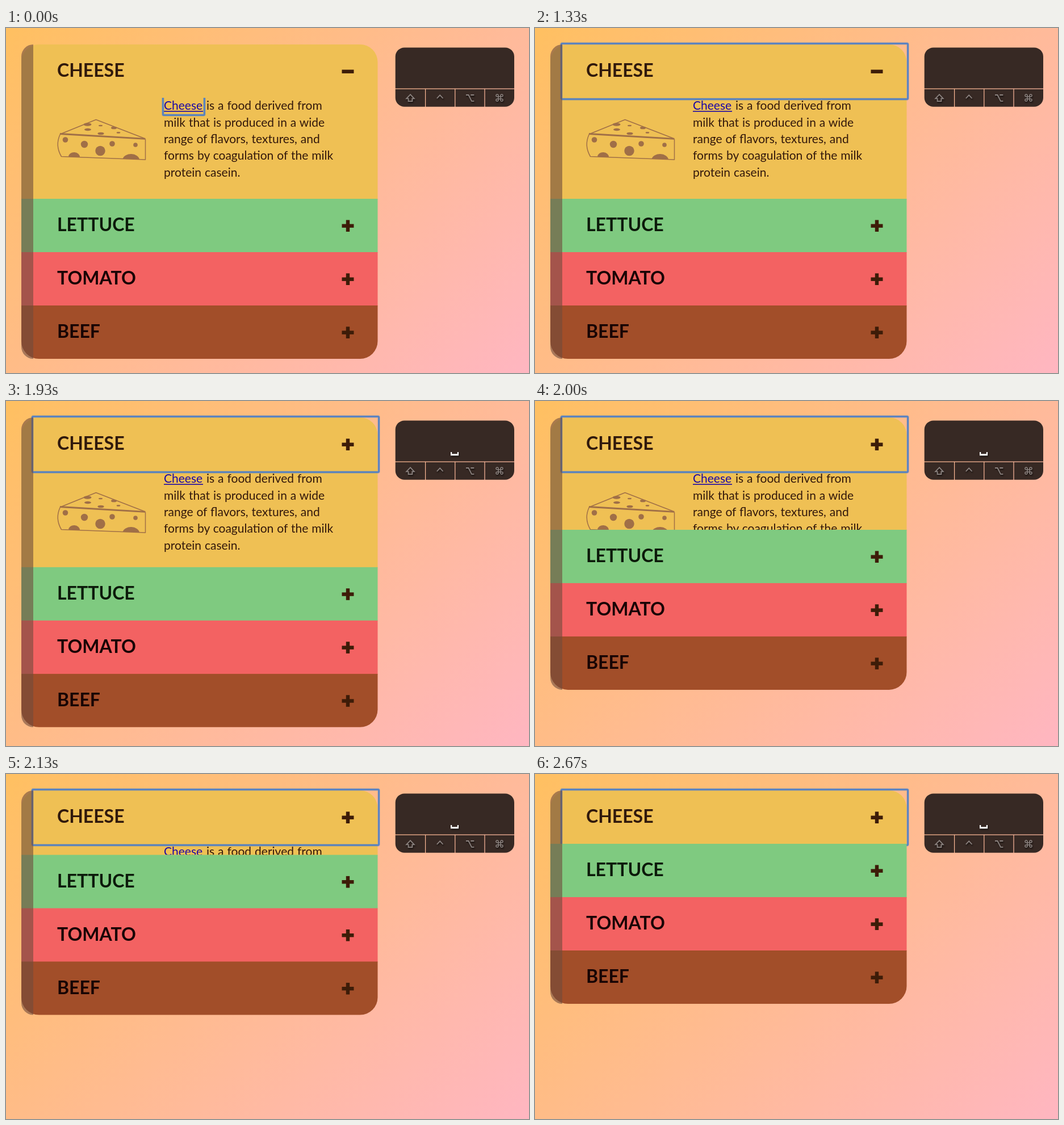
Recreate the animation shown at these times as an HTML page. Size 921 by 608 pixels, loop 2.79 s.

```html
<!DOCTYPE html>
<html lang="en">
<head>
<meta charset="utf-8">
<title>Sandwich accordion</title>
<style>
  html, body { margin: 0; width: 100%; height: 100%; overflow: hidden; }
  body { background: linear-gradient(135deg, #ffc061, #ffb6c1); }
  svg { display: block; width: 921px; height: 608px; }
  text { font-family: Lato, "Open Sans", sans-serif; }
  .title { font-size: 32px; font-weight: 700; }
  .copy { font-size: 21px; word-spacing: .6px; fill: #33180b; }
  .icon { fill: #3d1c08; }
  .ring { fill: none; stroke: #4f7fc6; }
  .ink { fill: none; stroke: #a06f47; stroke-width: 1.5; stroke-linejoin: round; }
  .hole { fill: #a06f47; }
  .key { fill: none; stroke: #8d8481; stroke-width: 1.8; }
  .shade { filter: drop-shadow(1px 2px 1px rgba(0, 0, 0, .6)); }
</style>
</head>
<body>
<svg id="stage" viewBox="0 0 921 608">
  <defs>
    <clipPath id="card"><rect id="cardBox" x="27" y="29" width="627.5" height="554" rx="31"/></clipPath>
    <clipPath id="fold"><rect id="foldBox" x="27" y="123" width="628" height="178"/></clipPath>
  </defs>

  <g clip-path="url(#card)">
    <rect id="cheeseBack" x="27" y="29" width="628" height="272" fill="#efc054"/>
    <g id="cheeseHead"></g>
    <g id="panel" clip-path="url(#fold)">
      <g id="wedge"></g>
      <g id="copy"></g>
      <g id="linkRing"></g>
    </g>
  </g>
  <g id="headRing"></g>
  <g clip-path="url(#card)"><g id="rest"></g></g>
  <path id="strip" fill="rgba(112,75,61,.6)"/>

  <g fill="#372924">
    <path d="M685.7 106.4V50.4a16 16 0 0 1 16-16H879a16 16 0 0 1 16-0V106.4Z" visibility="hidden"/>
    <path d="M685.7 106.4V50.4a16 16 0 0 1 16-16H879a16 16 0 0 1 16 16V106.4Z"/>
    <path d="M685.7 107.7H738V138.8H701.7a16 16 0 0 1-16-16Z"/>
    <path d="M739.2 107.7H790.2V138.8H739.2Z"/>
    <path d="M791.4 107.7H842.4V138.8H791.4Z"/>
    <path d="M843.6 107.7H895V122.8a16 16 0 0 1-16 16H843.6Z"/>
  </g>
  <g class="shade">
    <path id="shift" class="key" d="M712 117.2L718.8 124.3H715.4V129.2H708.6V124.3H705.2Z"/>
    <path class="key" d="M758.8 124L764.2 118.4L769.6 124"/>
    <path class="key" d="M810 118H814.5L820 128.8H824.3M818.3 118H824.3"/>
    <path class="key" style="stroke-width:1.5" transform="translate(869 123)"
      d="M-2-4a2 2 0 1 0-2 2h8a2 2 0 1 0-2-2v8a2 2 0 1 0 2-2h-8a2 2 0 1 0 2 2z"/>
  </g>
  <path id="space" class="shade" fill="#fff" d="M783 90H785.3V93.3H794.8V90H797.1V96.3H783Z"/>
</svg>
<script>
const LOOP = 2790, STEP = 200 / 3, LAST = 40;
const HEAD = 94, TOP = 29, BODY = 178;
const SHIFT_DOWN = 660, FOCUS_MOVES = 930, SHIFT_UP = 1130;
const SPACE_DOWN = 1800, FOLD_START = 1907, FOLD_TIME = 367;

const $ = id => document.getElementById(id);
const show = (id, on) => $(id).setAttribute('visibility', on ? 'visible' : 'hidden');

const bar = (w, h, y, id = '') =>
  `<rect ${id} class="icon" x="${602 - w / 2}" y="${y - h / 2}" width="${w}" height="${h}"/>`;

// One heading row; y is the top of the row.
const row = (name, y, ink, id = '') =>
  `<text class="title" x="90" y="${y + 57.4}" fill="${ink}">${name}</text>` +
  bar(21, 6.4, y + 47.7) + bar(6.4, 20.6, y + 47.7, id);

const ring = (x, y, w, h) => [[4.2, .45], [2.8, .9]].map(([s, o]) =>
  `<rect class="ring" x="${x}" y="${y}" width="${w}" height="${h}" rx="1.5" stroke-width="${s}" opacity="${o}"/>`).join('');

const hole = (x, y, rx, ry = rx) =>
  `<ellipse class="hole" cx="${x}" cy="${y}" rx="${rx}" ry="${ry}"/>`;

const line = (text, i, x = 278) =>
  `<text class="copy" x="${x}" y="${144.3 + i * 29.3}">${text}</text>`;

$('cheeseHead').innerHTML = row('CHEESE', TOP, '#30190c', 'id="upright"');

$('rest').innerHTML = [
  ['LETTUCE', '#7fca80', '#0c1a0a'],
  ['TOMATO', '#f36262', '#1a0405'],
  ['BEEF', '#a24e29', '#170404']
].map(([name, fill, ink], i) =>
  `<rect x="27" y="${i * HEAD}" width="628" height="${HEAD + 1}" fill="${fill}"/>` +
  row(name, i * HEAD, ink)).join('');

$('copy').innerHTML =
  `<text class="copy" x="278" y="144.3" style="fill:#1c07a5">Cheese</text>` +
  `<rect x="278" y="146" width="69" height="1.6" fill="#1c07a5"/>` +
  line('is a food derived from', 0, 353) +
  ['milk that is produced in a wide', 'range of flavors, textures, and',
    'forms by coagulation of the milk', 'protein casein.'].map((s, i) => line(s, i + 1)).join('');

$('wedge').innerHTML =
  `<path class="ink" d="M98 186L158.5 161.5L245 195M95.5 187Q86 207 97.5 226.5L245.5 232V196"/>` +
  `<path class="ink" style="stroke-width:2.8" d="M95 186.5L245.5 195.3"/>` +
  [[104.5, 197, 4.8], [138, 205, 6.2], [166, 216.5, 8.7], [187, 204, 4.8], [228, 206, 3.8],
    [143.5, 170, 7, 2.8], [166.5, 172, 3.5, 1.3], [190, 176, 5, 2.3], [144, 179, 6, 2.2],
    [167, 186, 5.6, 2.3], [198, 184.4, 3.3, 1.3]].map(h => hole(...h)).join('') +
  `<path class="hole" d="M110 227A10 8.5 0 0 1 130 227.8ZM205.5 230.5A15 11 0 0 1 235 231.6Z"/>`;

$('linkRing').innerHTML = ring(276.4, 119.5, 73, 34);
$('headRing').innerHTML = ring(46.4, 27.3, 610.2, 98);

// cubic-bezier(.25, .1, .25, 1)
function ease(x) {
  if (x <= 0) return 0;
  if (x >= 1) return 1;
  const curve = (a, b, u) => 3 * a * u * (1 - u) ** 2 + 3 * b * u * u * (1 - u) + u ** 3;
  let lo = 0, hi = 1;
  for (let i = 0; i < 24; i++) {
    const mid = (lo + hi) / 2;
    if (curve(.25, .25, mid) < x) lo = mid; else hi = mid;
  }
  return curve(.1, 1, lo);
}

// The picture advances 15 times a second and rests on the last step.
const tick = k => Math.round(k * STEP / 10) * 10;
function held(t) {
  let k = Math.min(LAST, Math.floor(t / STEP) + 1);
  while (tick(k) > t) k--;
  return tick(k);
}

function draw(now) {
  const t = held(now % LOOP);
  const body = BODY * (1 - ease((t - FOLD_START) / FOLD_TIME));
  const next = TOP + HEAD + body;
  const end = next + 3 * HEAD;

  $('cardBox').setAttribute('height', end - TOP);
  $('foldBox').setAttribute('height', body);
  $('cheeseBack').setAttribute('height', HEAD + body + 1);
  $('rest').setAttribute('transform', `translate(0 ${next})`);
  $('strip').setAttribute('d', `M48 ${TOP}A21 21 0 0 0 27 ${TOP + 21}V${end - 21}A21 21 0 0 0 48 ${end}Z`);

  show('panel', body > 0);
  show('upright', t >= FOLD_START);
  show('linkRing', t < FOCUS_MOVES);
  show('headRing', t >= FOCUS_MOVES);
  show('space', t >= SPACE_DOWN);
  $('shift').style.stroke = t >= SHIFT_DOWN && t < SHIFT_UP ? '#fff' : '';
}

const start = performance.now();
function loop() {
  draw(performance.now() - start);
  requestAnimationFrame(loop);
}
loop();
</script>
</body>
</html>
```
